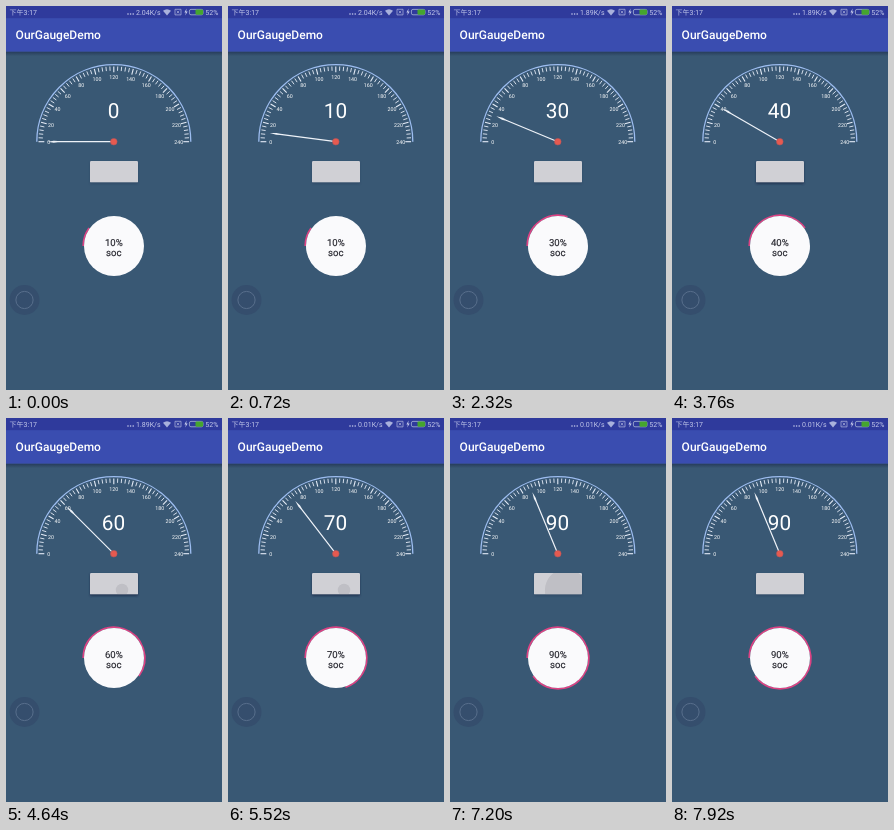
Animation of 216x384 px, one loop 8 s. Source, as an HTML page:

```html
<!DOCTYPE html>
<html lang="zh">
<head>
<meta charset="utf-8">
<title>Gauge</title>
<style>
  html, body { margin: 0; width: 100%; height: 100%; overflow: hidden; background: #395874; }
  svg { display: block; width: 100vw; height: 100vh; font-family: Roboto, sans-serif; }
  text { fill: #fff; text-rendering: geometricPrecision; }
  .status text { font: 7px Roboto, "Noto Sans CJK SC", "Noto Sans CJK", sans-serif; fill: #c3c8ea; }
  .soc text { font-size: 9.6px; fill: #25252d; stroke: #25252d; stroke-width: .15; }
  .mid { text-anchor: middle; }
</style>
</head>
<body>
<svg viewBox="0 0 216 384">
  <defs>
    <linearGradient id="fade" x2="0" y2="1">
      <stop stop-color="#1c2c4c" stop-opacity=".65"/>
      <stop offset="1" stop-color="#1c2c4c" stop-opacity="0"/>
    </linearGradient>
    <filter id="blur" x="-20%" y="-40%" width="140%" height="180%"><feGaussianBlur stdDeviation="1"/></filter>
    <clipPath id="face"><rect x="84" y="155" width="48" height="21.6" rx="1.2"/></clipPath>
  </defs>
  <rect width="216" height="384" fill="#395874"/>
  <rect y="45.6" width="216" height="4.5" fill="url(#fade)"/>
  <rect width="216" height="45.6" fill="#3a4db0"/>
  <rect width="216" height="12.2" fill="#2f3a9c"/>
  <text x="9.6" y="33" font-size="12" font-weight="500">OurGaugeDemo</text>

  <g class="status">
    <text x="3.5" y="8.8">下午3:17</text>
    <g fill="#c3c8ea"><circle cx="122" cy="8" r=".8"/><circle cx="124.6" cy="8" r=".8"/><circle cx="127.2" cy="8" r=".8"/></g>
    <text id="rate" x="130" y="8.8"></text>
    <path d="M157 4.8Q161 1.6 165 4.8L161 9.4Z" fill="#a9b1dc"/>
    <path d="M169 3.3h6v5.6h-6zM170.7 4.8l2.6 2.6m0-2.6l-2.6 2.6" fill="none" stroke="#b3b9e0" stroke-width=".7"/>
    <path d="M180.6 2.6l-2.2 3.8h1.5l-.7 3 2.5-4h-1.5z" fill="#c3c8ea"/>
    <rect x="183.4" y="3.4" width="13.6" height="5.4" rx="1.6" fill="none" stroke="#b9c6dc" stroke-width=".7"/>
    <rect x="189.5" y="3.4" width="7.6" height="5.4" rx="1.2" fill="#45a52f"/>
    <text x="199.3" y="8.8">52%</text>
  </g>

  <g transform="translate(107.8 135.7)">
    <path d="M-77 0A77 77 0 0 1 77 0" fill="none" stroke="#9dbdf0" stroke-width="1.3"/>
    <g id="scale"></g>
    <text id="speed" class="mid" x="-.3" y="-23.8" font-size="20.8"></text>
    <path id="needle" d="M0-.6L-56-.6-60-1-66.5 0-60 1-56 .6 0 .6Z" fill="#eef2f8"/>
    <circle r="3.3" fill="#e65a50" stroke="#b5565c" stroke-width=".6"/>
  </g>

  <rect id="shadow" x="84" y="156" width="48" height="22" rx="1.2" fill="#1d2f4e" filter="url(#blur)"/>
  <g clip-path="url(#face)">
    <rect x="84" y="155" width="48" height="21.6" fill="#d0d0d5"/>
    <circle id="ripple" cx="116" cy="172" fill="#777780"/>
  </g>

  <g class="soc">
    <path id="ring" fill="none" stroke="#dc4283" stroke-width="1.7"/>
    <circle cx="108" cy="240" r="30" fill="#fafafc"/>
    <text id="percent" class="mid" x="107.8" y="240.4"></text>
    <text class="mid" x="107.8" y="249.6">soc</text>
  </g>

  <circle cx="18.5" cy="294" r="15" fill="#354e6d"/>
  <circle cx="18.5" cy="294" r="8.6" fill="none" stroke="#5c728f" stroke-width=".9"/>
</svg>
<script>
const LOOP = 8000;
const presses = [160, 960, 1840, 2800, 3760, 4560, 5440, 6240, 7040];
const CLICK_DELAY = 80;
const $ = id => document.getElementById(id);
const clamp = x => Math.max(0, Math.min(1, x));
const polar = (r, deg) => {
  const a = deg * Math.PI / 180;
  return [r * Math.cos(a), r * Math.sin(a)].map(v => v.toFixed(2));
};

let marks = '';
for (let deg = 0; deg <= 180; deg += 3) {
  const major = deg % 15 === 0;
  const inner = polar(major ? 69.5 : 71, deg + 180), outer = polar(75.3, deg + 180);
  marks += `<path d="M${inner}L${outer}" stroke="#e6edf8" stroke-width="${major ? 1.1 : .9}"/>`;
  if (major) {
    const [x, y] = polar(65, deg + 180);
    marks += `<text class="mid" x="${x}" y="${+y + 1.9}" font-size="5.3">${deg / 15 * 20}</text>`;
  }
}
$('scale').innerHTML = marks;

function draw(t) {
  const speed = 10 * presses.filter(p => t >= p + CLICK_DELAY).length;
  const soc = Math.max(10, speed);
  $('speed').textContent = speed;
  $('needle').setAttribute('transform', `rotate(${speed * 180 / 240})`);
  $('percent').textContent = soc + '%';
  const [x, y] = polar(30.8, 180 + soc * 3.6);
  $('ring').setAttribute('d', `M77.2 240A30.8 30.8 0 ${+(soc > 50)} 1 ${108 + +x} ${240 + +y}`);
  $('rate').textContent = (t < 1600 ? '2.04' : t < 5280 ? '1.89' : '0.01') + 'K/s';

  // Touch feedback: the button lifts, the ripple spreads, then fades
  const since = t - (presses.findLast(p => t >= p) ?? -LOOP);
  const spread = clamp((since - 40) / 220);
  $('ripple').setAttribute('r', since < 60 ? 0 : 2 + 44 * spread ** 1.4);
  $('ripple').setAttribute('opacity', .2 * (1 - clamp((since - 220) / 250)));
  $('shadow').setAttribute('opacity', since < 160 ? .85 : .3);
}

function frame() {
  draw(performance.now() % LOOP);
  requestAnimationFrame(frame);
}
frame();
</script>
</body>
</html>
```
